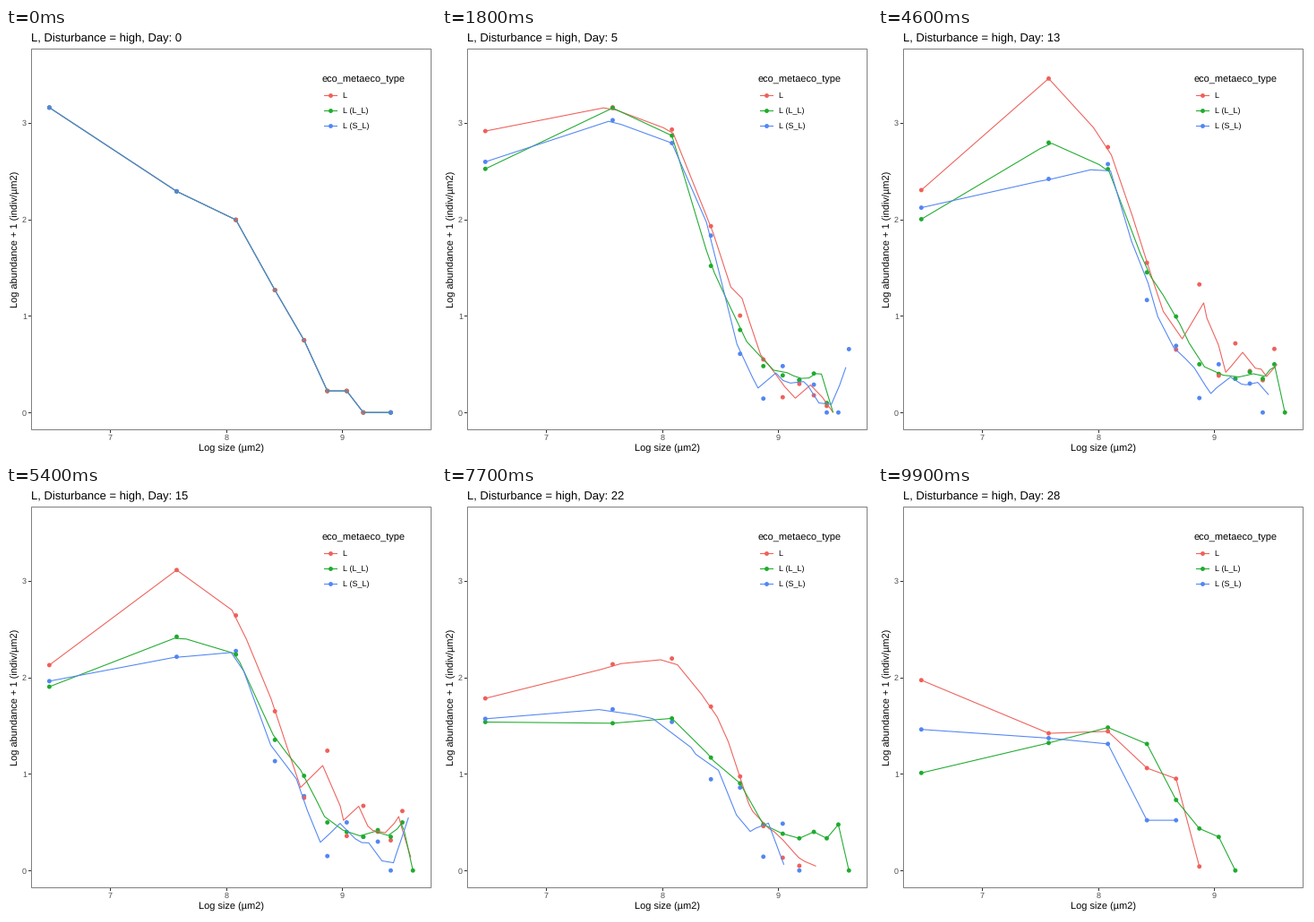
Recreate the animation shown at these times as a matplotlib script. Size 480 by 480 pixels, loop 10 s.

```python
import numpy as np
import matplotlib.pyplot as plt
from matplotlib.animation import FuncAnimation
from matplotlib.patches import Rectangle

plt.rcParams["font.family"] = "Liberation Sans"
plt.rcParams["text.hinting"] = "none"
plt.rcParams["text.hinting_factor"] = 1

SIZE, FRAMES, INTERVAL = 480, 100, 100
LAST_DAY, STEP = 28, 4
DAYS = np.arange(0, LAST_DAY + 1, STEP)
KEYS = [round(d * (FRAMES - 1) / LAST_DAY) for d in DAYS]
CLASSES, PATH_POINTS = 12, 50
LOG_SIZE = np.log(649 + 1296 * np.arange(CLASSES))

START = [3.156, 2.289, 1.994, 1.267, .748, .223, .223, 0, np.nan, 0]
KNOT_DAYS = [4, 12, 20, 28]
PEAK_DAY = 13

# head: small classes at the knot days; tail: large classes at the peak day,
# fading with the given width; counts: classes seen at each later sample
SERIES = [
    dict(label="L", color="#ef605a",
         head=[[3.00, 3.08, 2.95, 2.00, 1.07],
               [2.39, 3.63, 2.80, 1.50, .60],
               [1.73, 2.33, 2.40, 1.87, .98],
               [1.97, 1.42, 1.44, 1.06, .95]],
         tail=[1.39, .4, .75, .45, .35, .69, 0], width=8,
         counts=[10, 12, 11, 12, 8, 11, 6]),
    dict(label="L (L_L)", color="#1fab2e",
         head=[[2.60, 3.18, 2.90, 1.52, .83],
               [2.05, 2.98, 2.66, 1.50, 1.00],
               [1.68, 1.58, 1.60, 1.13, .95],
               [1.01, 1.32, 1.48, 1.31, .73]],
         tail=[.5, .4, .35, .42, .35, .5, 0], width=40,
         counts=[10, 12, 12, 12, 12, 12, 8]),
    dict(label="L (S_L)", color="#5286f3",
         head=[[2.66, 3.11, 2.80, 1.94, .60],
               [2.20, 2.52, 2.72, 1.18, .65],
               [1.60, 1.75, 1.60, 1.06, .95],
               [1.46, 1.37, 1.31, .52, .52]],
         tail=[.15, .5, .35, .3, 0, 0, .69], width=40,
         counts=[12, 11, 10, 12, 8, 6, 5]),
]
COLORS = [s["color"] for s in SERIES]


def px(x):
    return 116.3 + 129.5 * (np.asarray(x) - 7)


def py(y):
    return 429.2 - 107.85 * np.asarray(y)


def samples(head, tail, width, counts, **_):
    """Log abundance by sampling day and size class; nan where unseen."""
    rows = np.full((len(DAYS), CLASSES), np.nan)
    rows[0, :len(START)] = START
    for row, day, n in zip(rows[1:], DAYS[1:], counts):
        small = [np.interp(day, KNOT_DAYS, h) for h in zip(*head)]
        fade = np.exp(-((day - PEAK_DAY) / width) ** 2)
        row[:n] = np.append(small, fade * np.array(tail))[:n]
        if 6 < n < 11:
            row[n - 1] = 0
    return rows


def to_path(values):
    """Split the edges, in proportion to length, into a fixed point count."""
    keep = ~np.isnan(values)
    path = np.column_stack([LOG_SIZE[keep], values[keep]])
    lengths = np.hypot(*np.diff(path, axis=0).T)
    spare = PATH_POINTS - len(path)
    share = spare * lengths / lengths.sum()
    cuts = np.floor(share).astype(int)
    cuts[np.argsort(cuts - share)[:spare - cuts.sum()]] += 1
    parts = [np.linspace(a, b, k + 1, endpoint=False)
             for a, b, k in zip(path[:-1], path[1:], cuts)]
    return np.vstack(parts + [path[-1:]])


VALUES = [samples(**s) for s in SERIES]
PATHS = [[to_path(row) for row in v] for v in VALUES]

# The middle size classes stack the series the other way round
ORDER = [(c, s) for c in range(CLASSES)
         for s in ((2, 1, 0) if 2 <= c <= 7 else (0, 1, 2))]

fig = plt.figure(figsize=(SIZE / 72, SIZE / 72), dpi=72, facecolor="white")
ax = fig.add_axes([0, 0, 1, 1])
ax.set(xlim=(0, SIZE), ylim=(SIZE, 0))
ax.axis("off")

LEFT, RIGHT, TOP, BOTTOM = 28, 474, 23, 448
ax.add_patch(Rectangle((LEFT, TOP), RIGHT - LEFT, BOTTOM - TOP,
                       fill=False, ec="#7f7f7f", lw=1, zorder=5))


def label(x, y, text, size, **style):
    return ax.text(x, y, text, fontsize=size, **style)


TICK = dict(color="#333333", lw=1)
GREY = "#4d4d4d"
for v in (7, 8, 9):
    ax.plot([px(v)] * 2, [BOTTOM, BOTTOM + 3], **TICK)
    label(px(v), 460.3, str(v), 8.8, color=GREY, ha="center")
for v in range(4):
    ax.plot([LEFT - 3, LEFT], [py(v)] * 2, **TICK)
    label(23, py(v) + 3.3, str(v), 8.8, color=GREY, ha="right")

title = label(28, 15.3, "", 13.3)
label(251.3, 473, "Log size (µm2)", 11, ha="center")
label(16.5, 236, "Log abundance + 1 (indiv/µm2)", 11,
      rotation=90, ha="right", va="center")
label(353, 60, "eco_metaeco_type", 11)
for k, s in enumerate(SERIES):
    y = 74.6 + 17.3 * k
    ax.plot([355.2, 369], [y, y], color=s["color"], lw=1.07)
    ax.plot(362, y, "o", color=s["color"], ms=4.9, mew=0)
    label(375.6, y + 3.3, s["label"], 8.8)

dots = ax.scatter([], [], s=4.9 ** 2, linewidths=0, zorder=3)
lines = [ax.plot([], [], color=c, lw=1.07, zorder=4 + k / 10,
                 solid_capstyle="butt")[0] for k, c in enumerate(COLORS)]


def draw(i):
    a = np.searchsorted(KEYS, i, side="right") - 1
    b = min(a + 1, len(KEYS) - 1)
    t = (i - KEYS[a]) / (KEYS[b] - KEYS[a]) if b > a else 0

    day = round(LAST_DAY * i / (FRAMES - 1))
    title.set_text(f"L, Disturbance = high, Day: {day}")
    for line, paths in zip(lines, PATHS):
        x, y = ((1 - t) * paths[a] + t * paths[b]).T
        line.set_data(px(x), py(y))

    # Classes that vanish by the next sample hold still until then
    now = [np.where(np.isnan(v[b]), v[a], (1 - t) * v[a] + t * v[b])
           for v in VALUES]
    shown = [(c, s) for c, s in ORDER if not np.isnan(now[s][c])]
    dots.set_offsets([(px(LOG_SIZE[c]), py(now[s][c])) for c, s in shown])
    dots.set_facecolors([COLORS[s] for _, s in shown])
    return [title, dots, *lines]


anim = FuncAnimation(fig, draw, frames=FRAMES, interval=INTERVAL,
                     repeat=True, repeat_delay=0, blit=False)
plt.show()
```
